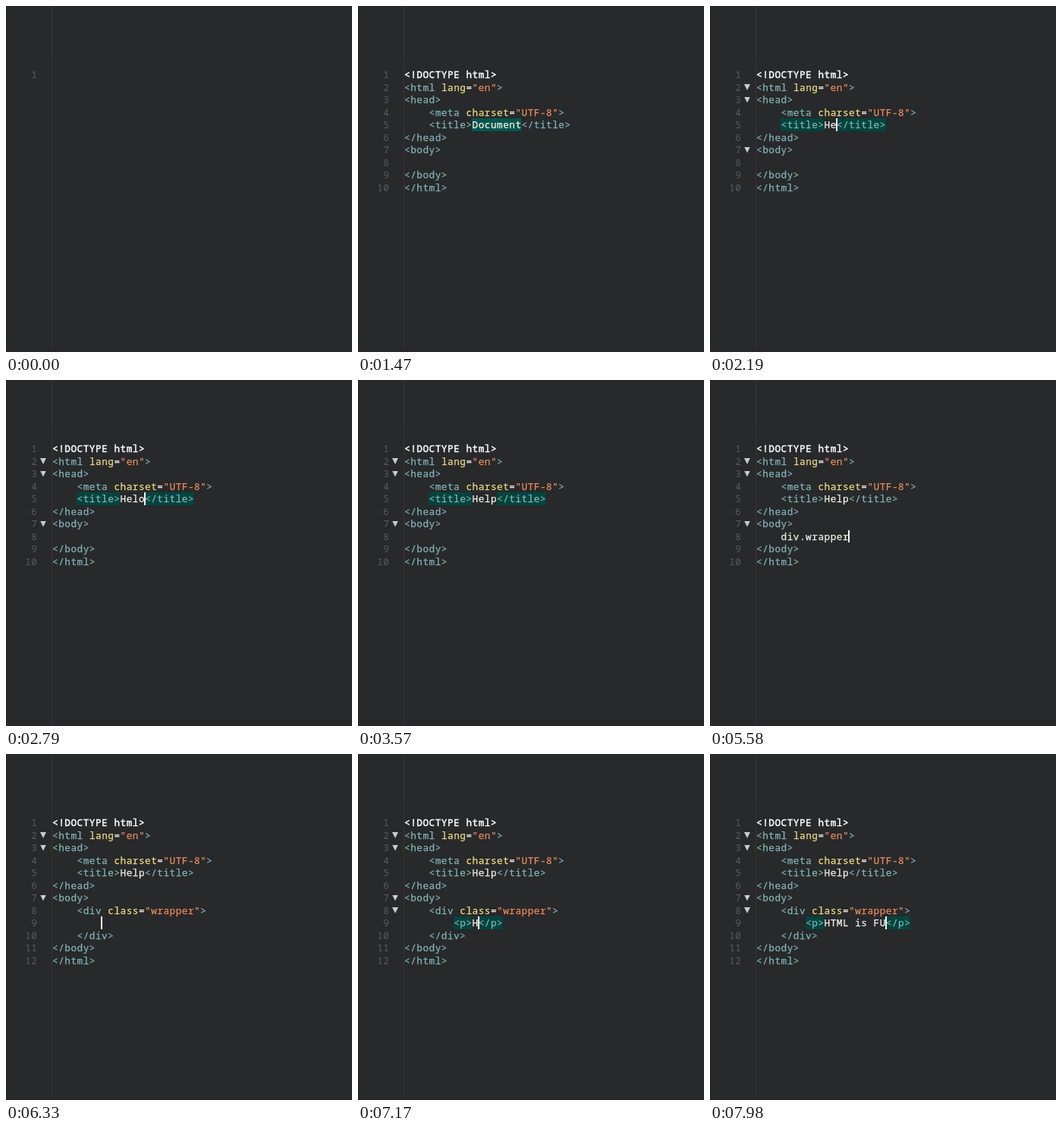
These frames come from a looping animation (456x456 px, 8 s). An HTML page:

```html
<!DOCTYPE html>
<html lang="en">
<head>
<meta charset="UTF-8">
<title>Typing HTML</title>
<style>
  html, body { margin: 0; width: 100%; height: 100%; overflow: hidden; background: #28292b; }
  #stage {
    position: relative; width: 456px; height: 456px; overflow: hidden;
    background: #28292b; color: #f4f2ea;
    font: 400 12.7px/16.5px "Noto Sans Mono", "DejaVu Sans Mono", monospace;
    letter-spacing: .516px; font-variant-ligatures: none;
  }
  #stage div { position: absolute; }
  #page { left: 0; top: 0; width: 456px; height: 456px; white-space: pre; }
  #rule { left: 60px; top: 0; width: 1px; height: 456px; background: linear-gradient(#343638 60px, #393234 80px); }
  #foot { left: 0; top: 454px; width: 456px; height: 2px; background: #2a2529; }
  .line { left: 61.1px; height: 16.5px; -webkit-text-stroke: .25px; }
  .num { left: 0; width: 41.5px; text-align: right; color: #575b5d; }
  .fold { left: 45px; width: 8px; height: 8px; background: #cbccca; clip-path: polygon(0 0, 100% 0, 50% 100%); }
  .doc { color: #fff; -webkit-text-stroke: .45px; }
  .tag { color: #82b4b5; }
  .attr { color: #ecdb82; }
  .str { color: #e58c5a; }
  .mark, .sel { height: 16.5px; }
  .mark { background: #03443f; }
  .sel { background: #04564e; }
  #caret { width: 1.5px; height: 16.5px; background: #f4f4f2; }
</style>
</head>
<body>
<div id="stage">
  <div id="rule"></div>
  <div id="foot"></div>
  <div id="page"></div>
  <div id="caret"></div>
</div>
<script>
const LOOP = 8000, CELL = 8.136, ROW = 16.5, LEFT = 60.8, TOP = 82, BLINK = 285;
const page = document.getElementById("page");
const caret = document.getElementById("caret");

// Each step: time, what changes in the document.
const steps = [
  [0, { text: "", caret: [0, 0] }],
  [30, {}],
  [1080, { text: "!", caret: [0, 1] }],
  [1470, { open: true, title: "Document", sel: [4, 11, 8], caret: null }],
  [1800, { folds: [1, 2, 6] }]
];
const add = (time, change) => steps.push([time, change]);

[[1860, "H"], [2060, "He"], [2250, "Hel"], [2580, "Helo"], [2940, "Hel"], [3120, "Help"]]
  .forEach(([time, title]) => add(time, {
    title, sel: null, caret: [4, 11 + title.length],
    marks: [[4, 4, 7], [4, 11 + title.length, 8]]
  }));

add(3720, { marks: [], caret: [7, 4] });

const word = "div.wrapper";
for (let i = 1; i <= word.length; i++)
  add(4560 + 88 * (i - 1), { body: ["    " + word.slice(0, i)], caret: [7, 4 + i] });

const div = '    <div class="wrapper">';
const inDiv = text => [div, "        " + text, "    </div>"];
add(5760, { body: [div + "</div>"], caret: [7, 25], marks: [[7, 4, 21], [7, 25, 6]] });
add(6090, { body: inDiv(""), caret: [8, 8], marks: [] });
add(6390, { folds: [1, 2, 6, 7] });
add(6510, { body: inDiv("p"), caret: [8, 9] });

const phrase = "HTML is FU";
for (let i = 0; i <= phrase.length; i++)
  add(i ? 7140 + 90 * (i - 1) : 6750, {
    body: inDiv("<p>" + phrase.slice(0, i) + "</p>"), caret: [8, 11 + i],
    marks: [[8, 8, 3], [8, 11 + i, 4]]
  });

function stateAt(t) {
  const s = { text: "", title: "", body: [""], marks: [], folds: [], sel: null, key: 0, index: 0 };
  steps.forEach(([time, change], i) => {
    if (time > t) return;
    Object.assign(s, change);
    s.index = i;
    if (!change.folds) s.key = time;
  });
  return s;
}

const linesOf = s => !s.open ? [s.text] : [
  "<!DOCTYPE html>", '<html lang="en">', "<head>", '    <meta charset="UTF-8">',
  "    <title>" + s.title + "</title>", "</head>", "<body>", ...s.body, "</body>", "</html>"
];

const safe = text => text.replace(/</g, "&lt;").replace(/>/g, "&gt;");
const span = (kind, text) => `<span class="${kind}">${safe(text)}</span>`;

function paint(line) {
  if (line.startsWith("<!")) return span("doc", line);
  return line.replace(/<[^>]*>|[^<]+/g, part => {
    if (part[0] !== "<") return safe(part);
    const m = part.match(/^(<\w+ )(\w+)=("[^"]*")>$/);
    return m
      ? span("tag", m[1]) + span("attr", m[2]) + "=" + span("str", m[3]) + span("tag", ">")
      : span("tag", part);
  });
}

const y = row => TOP + row * ROW;
const x = col => LEFT + col * CELL;
const box = (kind, [row, col, len]) =>
  `<div class="${kind}" style="left:${x(col)}px;top:${y(row)}px;width:${len * CELL}px"></div>`;

function draw(s) {
  let html = s.marks.map(m => box("mark", m)).join("");
  if (s.sel) html += box("sel", s.sel);
  linesOf(s).forEach((line, i) => {
    html += `<div class="num" style="top:${y(i)}px">${i + 1}</div>`;
    html += `<div class="line" style="top:${y(i)}px">${paint(line)}</div>`;
  });
  s.folds.forEach(i => { html += `<div class="fold" style="top:${y(i) + 4.5}px"></div>`; });
  page.innerHTML = html;
}

let shown = -1;
const start = performance.now();
function frame() {
  const t = Math.max(0, performance.now() - start) % LOOP;
  const s = stateAt(t);
  if (s.index !== shown) draw(s);
  shown = s.index;
  const on = s.caret && t >= 30 && Math.floor((t - s.key) / BLINK) % 2 === 0;
  caret.style.visibility = on ? "visible" : "hidden";
  if (on) {
    caret.style.left = x(s.caret[1]) - 0.4 + "px";
    caret.style.top = y(s.caret[0]) + "px";
  }
  requestAnimationFrame(frame);
}
frame();
</script>
</body>
</html>
```
